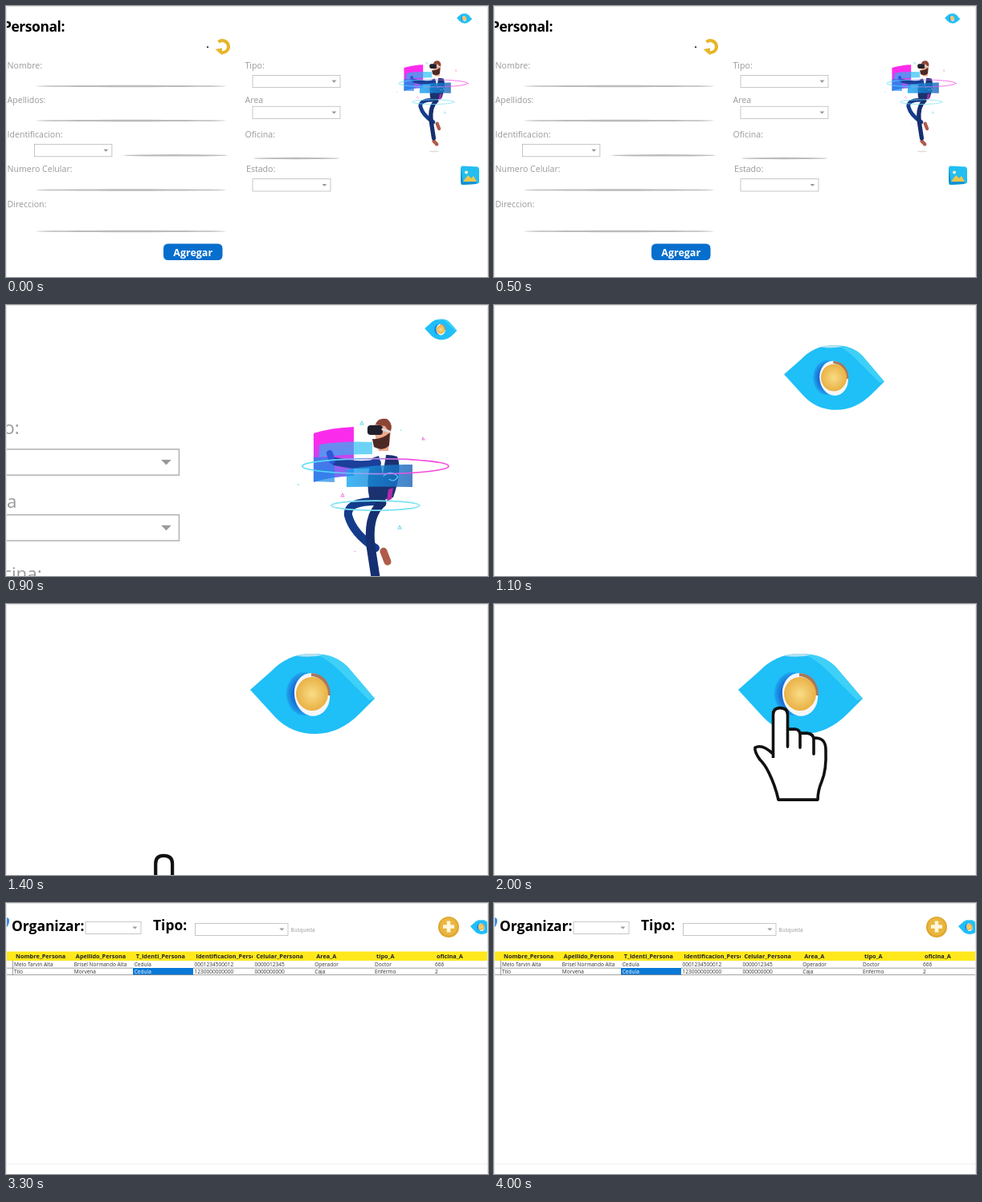
Write an HTML page that moves like this. It is 600 px wide and 338 px high and loops after 4.1 s.

```html
<!DOCTYPE html>
<html lang="es">
<head>
<meta charset="utf-8">
<style>
  html, body { margin: 0; width: 100%; height: 100%; overflow: hidden; background: #fff; }
  svg { display: block; width: 600px; height: 338px; font-family: "Open Sans", sans-serif; }
  .label { font-size: 10.6px; fill: #999; }
  .title { font-size: 17.4px; font-weight: 700; fill: #000; }
  .head { font-size: 7.3px; font-weight: 700; fill: #222; }
  .cell { font-size: 6.55px; fill: #333; }
</style>
</head>
<body>
<svg viewBox="0 0 600 338">
  <defs>
    <linearGradient id="ring"><stop offset=".2" stop-color="#4fdcf7"/><stop offset=".75" stop-color="#f548e0"/></linearGradient>
    <linearGradient id="screen" x2="0" y2="1"><stop offset=".3" stop-color="#fb14ea"/><stop offset="1" stop-color="#4a6cf0"/></linearGradient>
    <linearGradient id="glass"><stop offset="0" stop-color="#14a5f2"/><stop offset="1" stop-color="#1b62b8"/></linearGradient>
    <radialGradient id="gold"><stop offset="0" stop-color="#f9dc86"/><stop offset="1" stop-color="#e9b145"/></radialGradient>
    <radialGradient id="shade"><stop offset=".6" stop-color="#1668d0"/><stop offset="1" stop-color="#1fa8f0"/></radialGradient>
    <clipPath id="idCol"><path d="M233 60h74v12h-74z"/></clipPath>
    <clipPath id="rows"><path d="M0 72h600v17.3h-600z"/></clipPath>
    <g id="eye">
      <path fill="#1fbff7" d="M304 107L330 84Q350 63 378 62Q408 61 425 78L459 118L440 137Q415 162 385 162Q355 162 335 141Z"/>
      <path fill="#3fd0f8" d="M388 63Q408 62 425 78L459 118L452 120L416 84Q404 72 388 63Z"/>
      <path fill="#b5e2f3" d="M362 65Q378 59 394 64Q378 67 362 65Z"/>
      <ellipse cx="371" cy="112" rx="22" ry="27" fill="url(#shade)"/>
      <ellipse cx="381" cy="113" rx="22" ry="27" fill="#f4f6fa" transform="rotate(-10 381 113)"/>
      <path d="M380 88Q401 90 402 114" fill="none" stroke="#a8785a" stroke-width="4"/>
      <ellipse cx="381" cy="112" rx="20" ry="21" fill="url(#gold)"/>
    </g>
  </defs>

  <g id="form">
    <text class="title" x="73" y="32" text-anchor="end" letter-spacing="-.4">Personal:</text>
    <circle cx="251" cy="51.3" r="1.1" fill="#222"/>
    <path d="M264.5 45A7.5 7.5 0 1 1 268 58" fill="none" stroke="#e6b62a" stroke-width="4"/>
    <path d="M260.5 54L269 52.5L268.5 61Z" fill="#e6b62a"/>
    <g id="fields"></g>
    <rect x="196" y="296.5" width="73.5" height="20.5" rx="5.5" fill="#066fcd"/>
    <text x="232.7" y="311.5" font-size="12.5" font-weight="700" fill="#fff" text-anchor="middle">Agregar</text>

    <g transform="translate(597 2) scale(.4746) translate(-597 -2)" fill="none" stroke-linecap="round">
      <ellipse cx="462" cy="380" rx="13" ry="2" fill="#ddd"/>
      <path stroke="#b05a4a" stroke-width="9" d="M470 307L475 320M461 353L469 361"/>
      <path stroke="#143c8c" stroke-width="10" d="M468 245Q424 243 426 262Q432 285 460 303"/>
      <path stroke="#152f70" stroke-width="11" d="M468 247Q450 262 454 300L461 345"/>
      <path fill="#1b3270" d="M456 191Q472 184 487 189Q494 206 482 240L454 247Q446 220 456 191Z"/>
      <path fill="#fff" d="M463 182L474 182L469 212Z"/>
      <path fill="#b32aa8" d="M476 230L482 228L480 242L474 245Z"/>
      <path fill="#eda98c" d="M457 151Q466 142 480 151L476 182H464Z"/>
      <path fill="#4d2926" d="M456 167Q468 168 478 159L477 175Q470 183 458 177Z"/>
      <path fill="#8b4537" d="M460 149Q463 140 474 142Q483 148 478 160L472 151Z"/>
      <rect x="450" y="150" width="19" height="12" rx="4" fill="#20202c"/>
      <path stroke="#ddd" stroke-width="3" d="M469 155L478 158"/>
      <path fill="url(#screen)" opacity=".9" d="M383 160Q405 153 433 152V213Q405 214 383 221Z"/>
      <path fill="#20bcf2" opacity=".65" d="M390 174Q420 169 456 171V186Q420 186 390 190Z"/>
      <path fill="#1988e8" opacity=".7" d="M383 190H409V221L383 220Z"/>
      <path stroke="#1b3f9a" stroke-width="10" d="M462 197Q440 202 410 195"/>
      <path stroke="#2e56d8" stroke-width="8" d="M406 194l-3 -9"/>
      <path fill="url(#glass)" opacity=".8" d="M424 205Q465 198 506 199V227Q465 226 424 227Z"/>
      <path stroke="#54ccff" stroke-width="1.2" d="M470 213q9 -8 18 1q-5 8 -11 3"/>
      <ellipse cx="460" cy="201" rx="91" ry="9.5" stroke="url(#ring)" stroke-width="1.6"/>
      <ellipse cx="460" cy="250" rx="55" ry="6" stroke="#7be2f3" stroke-width="1.6"/>
      <path stroke="#6ed8ee" d="M441 149l2-4l2 4zM488 279l2-4l2 4zM363 224h2M491 156h1"/>
      <path stroke="#f07be3" d="M417 239l2-4l2 4zM518 168l1-3l2 3zM434 307h1"/>
    </g>

    <path d="M568 199.5L587 200.5Q589 201 589 204V220Q588 222 585 222L568 223Q566 222 566 219V202Q566 200 568 199.5Z" fill="#22bdf1"/>
    <path d="M566 202V219Q566 222 568 223L585 222L586 219L569 219.5Z" fill="#1590d2"/>
    <path d="M569 219L575 211L579 215L582 212L586 219Z" fill="#f0c54b"/>
    <circle cx="573" cy="207.5" r="2" fill="#fff3c4"/>
    <use href="#eye" transform="translate(597 2) scale(.1227) translate(-597 -2)"/>
  </g>

  <g id="table">
    <ellipse cy="25" rx="3.5" ry="7" fill="#3f8fe6" transform="rotate(20 0 25)"/>
    <text class="title" x="7" y="35">Organizar:</text>
    <text class="title" x="183" y="33.5">Tipo:</text>
    <text x="354.5" y="36" font-size="6.4" fill="#999">Busqueda</text>
    <circle cx="551" cy="30" r="13" fill="#dfa62f"/>
    <circle cx="551" cy="29.5" r="11" fill="#e9b63f"/>
    <path d="M551 22.5v14M544 29.5h14" stroke="#fff6dc" stroke-width="4.6"/>
    <use href="#eye" transform="translate(592 30) scale(.18) translate(-382 -112)"/>
    <path d="M0 60.5H600V72H0Z" fill="#ffe81c"/>
    <path d="M158 81H233V90H158Z" fill="#0a78d7"/>
    <path d="M0 81.2H158M233 81.2H600M0 89.6H600M8.5 72V90" fill="none" stroke="#888" stroke-width=".8"/>
    <path d="M0 325.5H600" stroke="#f1f1f1"/>
    <g id="grid"></g>
  </g>

  <path id="hand" fill="#fff" stroke="#111" stroke-width="3.6" stroke-linejoin="round" d="M347.5 192V138Q347.5 129.5 356 129.5Q365.5 129.5 365.5 138V178V156H375Q381 157 381 163V179V161H390Q398 162 398 169V187V167Q413 166 413 182Q414 207 408 221Q403 233 403 244H354Q350 226 342 210Q337 200 331 194Q324 184 325 179Q334 174 347.5 187"/>
  <path d="M.5 338V.5H599.5V338" fill="none" stroke="#e4e4e4"/>
</svg>
<script>
const el = id => document.getElementById(id);
const add = (id, markup) => el(id).insertAdjacentHTML('beforeend', markup);
const label = (x, y, text, cls = 'label', extra = '') =>
  `<text class="${cls}" x="${x}" y="${y}" ${extra}>${text}</text>`;
const line = (x1, x2, y) =>
  `<ellipse cx="${(x1 + x2) / 2}" cy="${y}" rx="${(x2 - x1) / 2}" ry="1.2" fill="#bbb"/>`;
const combo = (x, y, w) =>
  `<rect x="${x}" y="${y}" width="${w}" height="15.3" fill="#fff" stroke="#b0b0b0" stroke-width=".7"/>
   <path d="M${x + w - 10.6} ${y + 6.2}h6l-3 3.1z" fill="#999"/>`;

add('fields', [
  label(1.5, 77.5, 'Nombre:'), label(1.5, 121, 'Apellidos:'), label(1.5, 164, 'Identificacion:'),
  label(1.5, 207, 'Numero Celular:'), label(1.5, 251, 'Direccion:'),
  label(297.5, 77.5, 'Tipo:'), label(297.5, 121, 'Area'), label(297.5, 164, 'Oficina:'), label(299, 207, 'Estado:'),
  line(37, 274, 100), line(37, 274, 143), line(146, 276, 186.3), line(37, 274, 229.5), line(37, 274, 281), line(308, 415, 190),
  combo(307, 86.4, 109), combo(307, 125.2, 109), combo(35.4, 172.5, 96.5), combo(307, 215.7, 97),
].join(''));

add('table', combo(99, 23.3, 69) + combo(235.5, 25.3, 115.5));
const heads = ['Nombre_Persona', 'Apellido_Persona', 'T_Identi_Persona', 'Identificacion_Persona',
  'Celular_Persona', 'Area_A', 'tipo_A', 'oficina_A'];
const people = [
  ['Melo Tarvin Alta', 'Brisel Normando Alta', 'Cedula', '0001234500012', '0000012345', 'Operador', 'Doctor', '666'],
  ['Tilo', 'Morvena', 'Cedula', '1230000000000', '0000000000', 'Caja', 'Enfermo', '2'],
];
const column = i => 10 + i * 74.85;
add('grid', heads.map((h, i) =>
  `<g ${i === 3 ? 'clip-path="url(#idCol)"' : ''}>${label(column(i) + 2, 69, h, 'head')}</g>`).join(''));
add('grid', '<g clip-path="url(#rows)">' + people.map((row, r) => row.map((text, i) =>
  label(column(i), 79.3 + r * 9, text, 'cell', r && i === 2 ? 'style="fill:#fff"' : '')).join('')).join('') + '</g>');

const LOOP = 4100, STEP = 100, ZOOM = 8.15;
const clamp = (v, lo = 0, hi = 1) => Math.min(hi, Math.max(lo, v));
const show = (id, on) => { el(id).style.display = on ? '' : 'none'; };

function draw(now) {
  const t = Math.floor(now / STEP) * STEP % LOOP;
  const clicked = t >= 2500;
  show('form', !clicked);
  show('table', clicked);
  show('hand', t >= 1300 && !clicked);

  // Camera: exponential zoom about the top right corner
  const u = clamp((t - 698) / 502);
  const zoom = ZOOM ** (u * u * (3 - 2 * u));
  el('form').setAttribute('transform', `translate(597 2) scale(${zoom}) translate(-597 -2)`);

  // Pointer: glides in, then shrinks as it presses
  const left = clamp((2400 - t) / 1100) ** 2.75;
  const size = clamp(1.16 - (t - 1800) * .0008, .88, 1.16);
  el('hand').setAttribute('transform',
    `translate(${370 - 226 * left} ${112 + 260 * left}) scale(${size}) translate(-356 -128)`);
  requestAnimationFrame(() => draw(performance.now() - start));
}
const start = performance.now();
draw(0);
</script>
</body>
</html>
```
